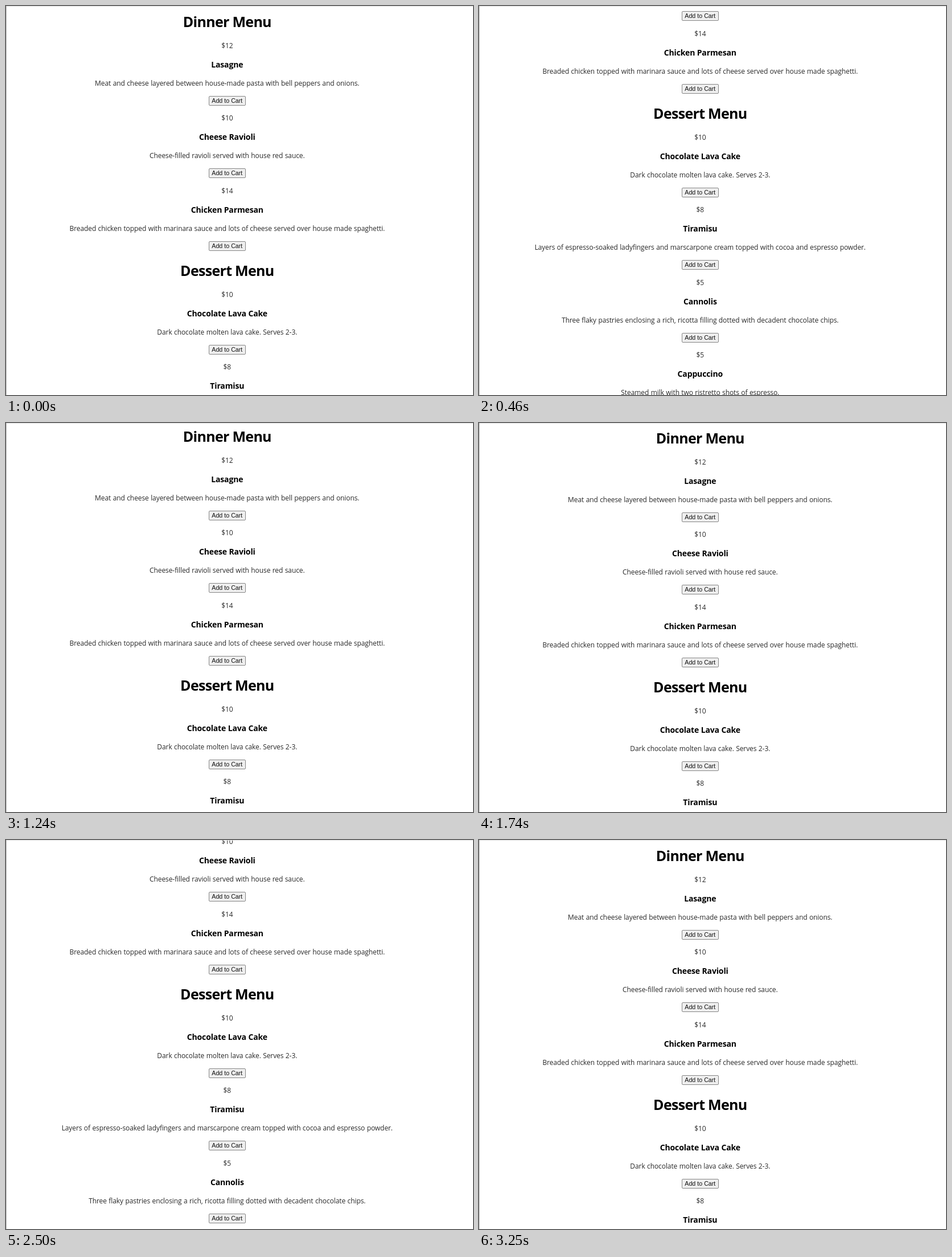
An HTML page for the animation above (3.35 s loop, 820x683 px).

```html
<!DOCTYPE html>
<html lang="en">
<head>
<meta charset="utf-8">
<title>Menu</title>
<style>
  html, body { margin: 0; width: 100%; height: 100%; overflow: hidden; background: #fff; }
  svg { display: block; width: 820px; height: 683px; }
  text { text-anchor: middle; font-family: "Open Sans", "Noto Sans", sans-serif; }
  .menu { font-size: 25px; font-weight: 700; letter-spacing: -.7px; }
  .dish { font-size: 14px; font-weight: 700; letter-spacing: -.14px; }
  .body { font-size: 12px; letter-spacing: -.085px; word-spacing: .4px; fill: #2a2a2a; }
  .label { font: 10.7px "Liberation Sans", Arial, sans-serif; fill: #111; }
  .button { fill: #efefef; stroke: #858585; }
</style>
</head>
<body>
<svg viewBox="0 0 820 683">
  <g id="page"></g>
  <path d="M0 .5H820" stroke="#e2e2e2"/>
  <path d="M.5 0V683" stroke="#b4b4b4"/>
</svg>
<script>
const LOOP = 3350, CENTER = 388.3, ITEM_HEIGHT = 127.4;
const page = document.getElementById('page');

const menus = [
  { title: 'Dinner Menu', top: 0, items: [
    ['$12', 'Lasagne', 'Meat and cheese layered between house-made pasta with bell peppers and onions.'],
    ['$10', 'Cheese Ravioli', 'Cheese-filled ravioli served with house red sauce.'],
    ['$14', 'Chicken Parmesan', 'Breaded chicken topped with marinara sauce and lots of cheese served over house made spaghetti.']
  ] },
  { title: 'Dessert Menu', top: 437, items: [
    ['$10', 'Chocolate Lava Cake', 'Dark chocolate molten lava cake. Serves 2-3.'],
    ['$8', 'Tiramisu', 'Layers of espresso-soaked ladyfingers and marscarpone cream topped with cocoa and espresso powder.'],
    ['$5', 'Cannolis', 'Three flaky pastries enclosing a rich, ricotta filling dotted with decadent chocolate chips.'],
    ['$5', 'Cappuccino', 'Steamed milk with two ristretto shots of espresso.']
  ] }
];

function add(tag, attributes, content = '') {
  const node = document.createElementNS('http://www.w3.org/2000/svg', tag);
  for (const name in attributes) node.setAttribute(name, attributes[name]);
  node.textContent = content;
  page.append(node);
}

const write = (style, y, content) => add('text', { class: style, x: CENTER, y }, content);

for (const { title, top, items } of menus) {
  write('menu', top + 37, title);
  items.forEach(([price, dish, description], i) => {
    const y = Math.round(top + 74 + i * ITEM_HEIGHT);
    write('body', y, price);
    write('dish', y + 34, dish);
    write('body', y + 66, description);
    add('rect', { class: 'button', x: 356.5, y: y + 84.5, width: 64, height: 16, rx: 1.5 });
    write('label', y + 96, 'Add to Cart');
  });
}

// The page scrolls in hard steps: [start in ms, scroll offset].
const steps = [
  [0, 0], [190, 2], [290, 132], [460, 276],
  [910, 272], [990, 240], [1070, 155], [1150, 58], [1240, 4],
  [1410, 2], [1490, 0], [1740, 1], [1840, 140], [1980, 276],
  [2420, 262], [2500, 194], [2590, 84], [2710, 3], [2870, 1], [2980, 0]
];

function draw(now) {
  const time = now % LOOP;
  const scroll = steps.findLast(([start]) => start <= time)[1];
  page.setAttribute('transform', `translate(0 ${-scroll})`);
  requestAnimationFrame(draw);
}
draw(performance.now());
</script>
</body>
</html>
```
